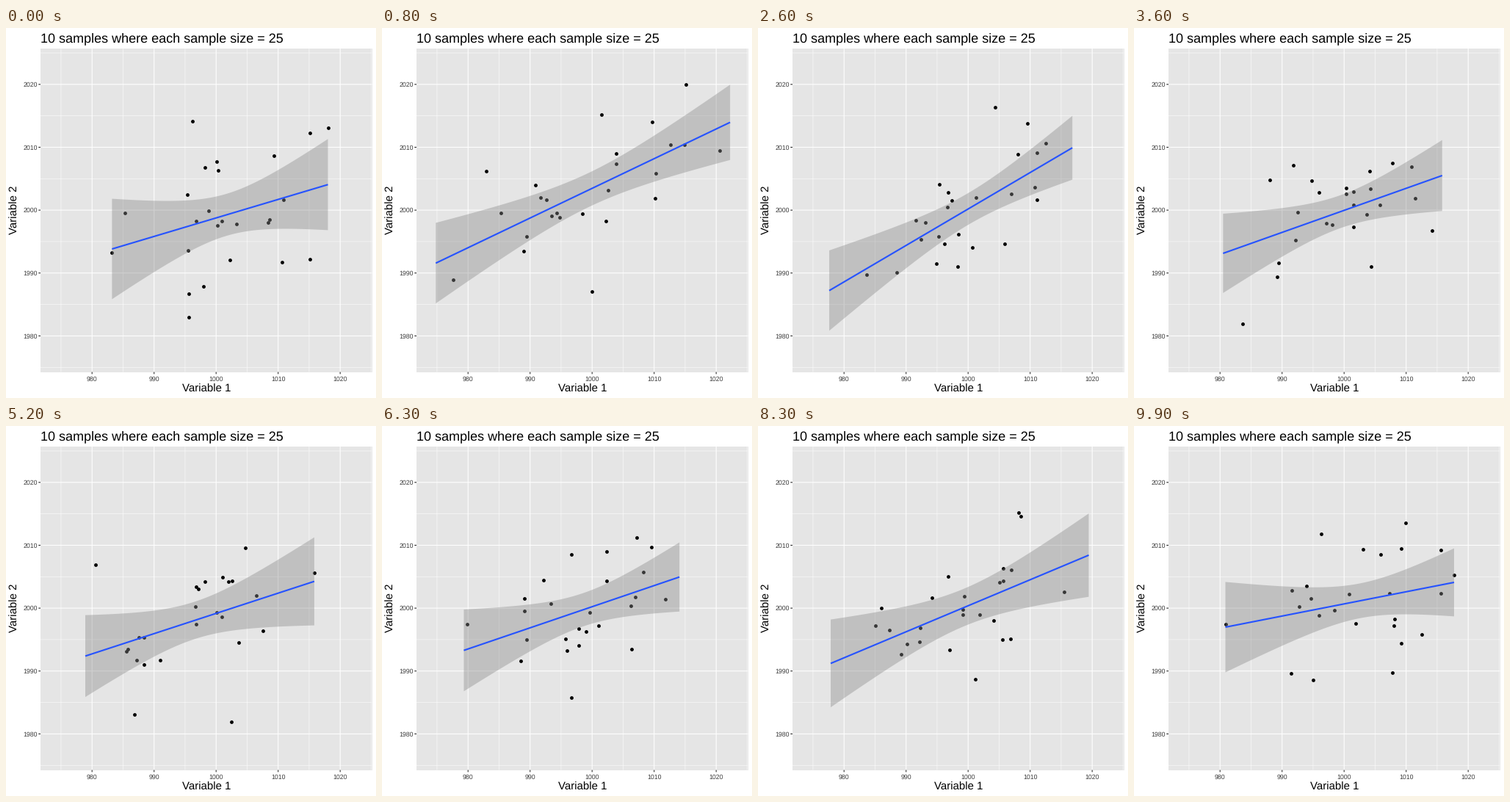
Write a matplotlib script that moves like this. It is 504x504 px and loops after 10 s.

```python
import numpy as np
import matplotlib.pyplot as plt
from matplotlib.animation import FuncAnimation
from matplotlib.patches import Polygon, Rectangle

SIZE, FRAMES, STEP = 504, 100, 11
LEFT, TOP, RIGHT, BOTTOM = 47, 28, 498.5, 468.6
N, T95 = 25, 2.069  # sample size, t quantile for 23 degrees of freedom
plt.rcParams["font.family"] = "Liberation Sans"
plt.rcParams["text.hinting"] = "none"
rng = np.random.default_rng(25)

# Fitted line of each sample: x ends, y ends (pixels),
# mean x as a share of the span, half width of the band at its waist
FITS = [
    (144.4, 438.5, 301, 213.3, 0.53, 28.6),
    (67, 477.3, 322, 121, 0.52, 22.8),
    (90.5, 430.6, 370, 154, 0.58, 21.4),
    (124.4, 418.1, 306, 201.4, 0.535, 22.2),
    (86.5, 438.5, 318, 196, 0.53, 25),
    (109.9, 418.3, 313, 213, 0.473, 25.4),
    (111.6, 404, 305, 205, 0.56, 22.3),
    (141.2, 404, 295.8, 209.9, 0.54, 18.8),
    (73.6, 478.5, 340, 155.5, 0.507, 29.6),
    (124.5, 436, 274, 213, 0.588, 23.7),
]


def make_sample(x0, x1, y0, y1, centre, waist):
    """Random points whose regression is the given line, and its 95% band."""
    z = rng.normal(size=N - 2).clip(-1.7, 1.7)
    z = (z - z.mean()) / z.std()
    inner = (N * centre - 1) / (N - 2) + 0.207 * z
    u = rng.permutation(np.concatenate([[0, 1], inner]))

    noise = rng.normal(size=N)
    noise -= np.polyval(np.polyfit(u, noise, 1), u)
    sigma = waist * np.sqrt(N) / T95
    noise *= sigma * np.sqrt(N - 2) / np.linalg.norm(noise)

    def on_line(t):
        return np.array([x0 + (x1 - x0) * t, y0 + (y1 - y0) * t])

    dots = on_line(u) + [np.zeros(N), noise]
    t = np.linspace(0, 1, 80)
    half = waist * np.hypot(1, (t - centre) / u.std())
    return dots.T, np.vstack([on_line(t), half])


def tween(states, i):
    """Cubic in-out from one state to the next."""
    k, r = divmod(i, STEP)
    t = r / STEP
    share = 4 * t**3 if t < 0.5 else 1 - 4 * (1 - t)**3
    following = states[min(k + 1, len(states) - 1)]
    return states[k] * (1 - share) + following * share


def px(value):
    return 286.2 + (value - 1000) * 8.45


def py(value):
    return 248.1 - (value - 2000) * 8.565


samples, curves = zip(*(make_sample(*fit) for fit in FITS))

fig = plt.figure(figsize=(SIZE / 72, SIZE / 72), dpi=72, facecolor="white")
ax = fig.add_axes([0, 0, 1, 1])
ax.set(xlim=(0, SIZE), ylim=(SIZE, 0))
ax.axis("off")
ax.add_patch(Rectangle((LEFT, TOP), RIGHT - LEFT, BOTTOM - TOP,
                       fc="#e5e5e5", lw=0, zorder=0))


def rules(xs, ys, x_span, y_span, color, width):
    """Vertical lines at xs over y_span, horizontal ones at ys over x_span."""
    style = dict(colors=color, lw=width, zorder=1, snap=False)
    ax.vlines([px(v) for v in xs], *y_span, **style)
    ax.hlines([py(v) for v in ys], *x_span, **style)


panel = (LEFT, RIGHT), (TOP, BOTTOM)
x_ticks, y_ticks = range(980, 1021, 10), range(1980, 2021, 10)
rules(range(975, 1026, 10), range(1975, 2026, 10), *panel, "white", 0.53)
rules(x_ticks, y_ticks, *panel, "white", 1.07)
rules(x_ticks, y_ticks, (LEFT - 2.75, LEFT), (BOTTOM, BOTTOM + 2.75),
      "#252525", 1.07)

label = dict(size=8.8, color="#3c3c3c", va="baseline")
for v in x_ticks:
    ax.text(px(v), 481, str(v), ha="center", **label)
for v in y_ticks:
    ax.text(42.6, py(v) + 3.2, str(v), ha="right", **label)
ax.text(LEFT, 19, "10 samples where each sample size = 25", size=18)
ax.text(272.8, 496, "Variable 1", size=15, ha="center")
ax.text(16, py(2000), "Variable 2", size=15, rotation=90,
        ha="center", va="baseline", rotation_mode="anchor")

dots = ax.scatter([], [], s=4.85**2, c="black", lw=0, zorder=3, snap=False)
ribbon = ax.add_patch(Polygon([(0, 0)] * 3, fc="#8a8a8a", alpha=0.4,
                              lw=0, zorder=4))
line, = ax.plot([], [], color="#2653ff", lw=2.13, zorder=5,
                solid_capstyle="butt")


def update(i):
    dots.set_offsets(tween(samples, i))
    x, y, half = tween(curves, i)
    edge = np.concatenate([y - half, (y + half)[::-1]])
    ribbon.set_xy(np.column_stack([np.concatenate([x, x[::-1]]), edge]))
    line.set_data(x, y)
    return dots, ribbon, line


anim = FuncAnimation(fig, update, frames=FRAMES, interval=100,
                     repeat=True, repeat_delay=0, blit=False)
plt.show()
```
